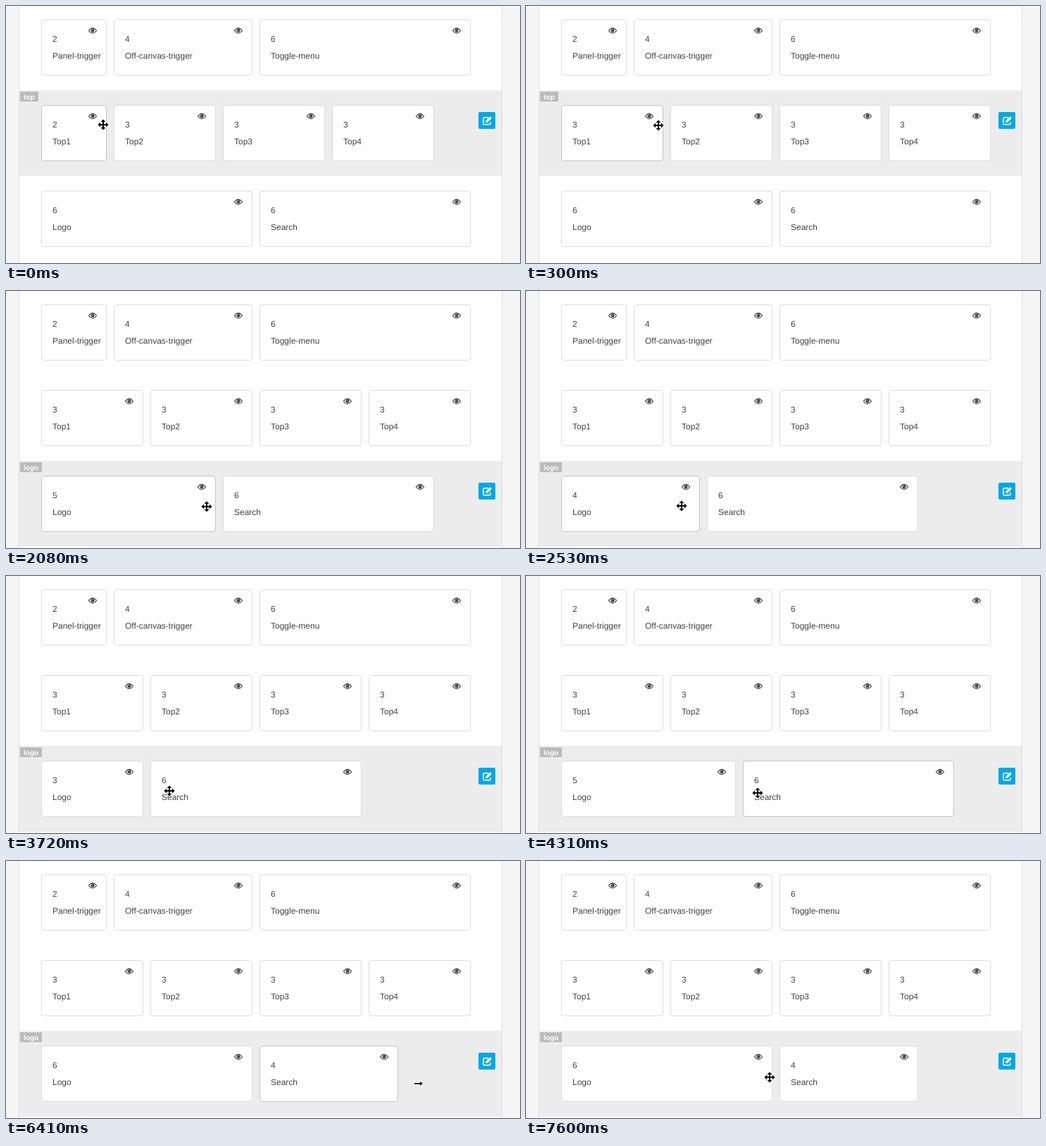
An HTML page with a canvas that plays this animation: 730x366 px, repeating every 8 s.

```html
<!DOCTYPE html>
<html lang="en">
<head>
<meta charset="utf-8">
<title>Layout grid editor</title>
<style>
  html, body { margin: 0; width: 100%; height: 100%; overflow: hidden; background: #f5f5f5; }
  canvas { display: block; }
</style>
</head>
<body>
<canvas id="stage" width="730" height="366"></canvas>
<script>
const ctx = document.getElementById('stage').getContext('2d');
const LOOP = 8000, TICK = 149, COLUMN = 155 / 3, GAP = 10, LEFT = 50;
const ROW_HEIGHT = 122, FADE_TICKS = 1.75;
const FONT = '"Liberation Sans", Arial, sans-serif';

const startSpans = {
  'Panel-trigger': 2, 'Off-canvas-trigger': 4, 'Toggle-menu': 6,
  Top1: 2, Top2: 3, Top3: 3, Top4: 3,
  Logo: 6, Search: 6
};
const rows = [
  { label: 'menu', top: -2, names: ['Panel-trigger', 'Off-canvas-trigger', 'Toggle-menu'] },
  { label: 'top', top: 120, names: ['Top1', 'Top2', 'Top3', 'Top4'] },
  { label: 'logo', top: 242, names: ['Logo', 'Search'] }
];
// Cursor moves in ticks; a move with a card drags that card's edge to a new span
const moves = [
  { start: 0, end: 1, x: 188, y: 170, card: 'Top1', span: 3 },
  { start: 5, end: 8, x: 332, y: 309 },
  { start: 9, end: 11, x: 345, y: 309 },
  { start: 12, end: 20, x: 196, y: 305, card: 'Logo', span: 3 },
  { start: 24, end: 31, x: 345, y: 309, card: 'Logo', span: 6 },
  { start: 34, end: 39, x: 661, y: 317 },
  { start: 41, end: 43, x: 586, y: 317, card: 'Search', span: 4 },
  { start: 43, end: 51, x: 346, y: 308 }
];

const smooth = p => p * p * (3 - 2 * p);
const easeOut = p => 1 - (1 - p) ** 1.8;

function stateAt(tick) {
  const state = { x: 138, y: 169, spans: { ...startSpans } };
  for (const { start, end, x, y, card, span } of moves) {
    if (tick <= start) break;
    const p = Math.min(1, (tick - start) / (end - start));
    const eased = card ? easeOut(p) : smooth(p);
    state.x += (x - state.x) * eased;
    state.y += (y - state.y) * eased;
    if (card) state.spans[card] += Math.trunc((span - state.spans[card]) * eased);
  }
  return state;
}

function layout({ top, names }, spans) {
  let left = LEFT;
  return names.map(name => {
    const span = spans[name], x = Math.round(left);
    const right = Math.round(left + span * COLUMN - GAP);
    left += span * COLUMN;
    return { name, span, x, right, top: top + 21 };
  });
}

function cardUnderCursor({ x, y, spans }) {
  const card = rows.flatMap(row => layout(row, spans))
    .find(c => x >= c.x && x <= c.right && y >= c.top && y <= c.top + 80);
  return card && card.name;
}

// Share of the recent past that the cursor spent in the row
function glowOf({ top }, tick) {
  const samples = 24;
  let inside = 0;
  for (let i = 0; i < samples; i++) {
    const { y } = stateAt(tick - FADE_TICKS * i / samples);
    if (y >= top && y < top + ROW_HEIGHT) inside++;
  }
  return inside / samples;
}

function rect(x, y, w, h, color) {
  ctx.fillStyle = color;
  ctx.fillRect(x, y, w, h);
}

function rounded(x, y, w, h, radius, color) {
  ctx.beginPath();
  ctx.roundRect(x, y, w, h, radius);
  ctx.fillStyle = color;
  ctx.fill();
}

function text(string, x, y, color, font) {
  ctx.fillStyle = color;
  ctx.font = `${font} ${FONT}`;
  ctx.fillText(string, x, y);
}

function shape(path, x, y, { fill, stroke, width }) {
  const outline = new Path2D(path);
  ctx.save();
  ctx.translate(x, y);
  if (stroke) {
    ctx.strokeStyle = stroke;
    ctx.lineWidth = width;
    ctx.stroke(outline);
  }
  if (fill) {
    ctx.fillStyle = fill;
    ctx.fill(outline);
  }
  ctx.restore();
}

function eye(x, y) {
  shape('M-5.6 0Q0-7.2 5.6 0Q0 7.2-5.6 0Z', x, y, { stroke: '#444', width: 1.1 });
  shape('M-2.6-.4a2.6 2.6 0 1 0 5.2 0a2.6 2.6 0 1 0-5.2 0', x, y, { fill: '#444' });
  shape('M-1.4-.6A1.4 1.4 0 0 1 0-2', x, y, { stroke: '#fff', width: .6 });
}

function drawCard({ name, span, x, right, top }, active) {
  rounded(x + .5, top + .5, right - x - 1, 79, 3.5, '#fff');
  ctx.strokeStyle = active ? '#c4c4c4' : '#dcdcdc';
  ctx.lineWidth = 1;
  ctx.stroke();
  text(span, x + 16, top + 32, '#444', '12px');
  text(name, x + 16, top + 56, '#444', '12px');
  eye(right - 20, top + 16);
}

function drawRow(row, tick, spans, hovered) {
  const { label, top } = row, glow = glowOf(row, tick);
  if (glow) {
    ctx.globalAlpha = smooth(glow);
    rect(19, top, 685, ROW_HEIGHT, '#ececec');
    const x = Math.round(20 - (1 - glow) * 2.5);
    ctx.font = `bold 10px ${FONT}`;
    ctx.globalAlpha = glow;
    rect(x, top + 2, Math.round(ctx.measureText(label).width) + 10, 14, '#bbb');
    ctx.globalAlpha = Math.min(1, glow * 1.2);
    rounded(671, top + 31, 24, 24, 2, '#00a8e6');
    ctx.globalAlpha = 1;
    text(label, x + 5, top + 12.5, '#fff', 'bold 10px');
    shape('M14 7.7H8.7Q7 7.7 7 9.4V16Q7 17.7 8.7 17.7H15.3Q17 17.7 17 16V14', 671, top + 31, { stroke: '#fff', width: 1.6 });
    shape('M10.2 12.4L16.4 6.2L18.9 8.7L12.7 14.9H10.2Z', 671, top + 31, { fill: '#fff' });
  }
  for (const card of layout(row, spans)) drawCard(card, card.name === hovered);
}

function drawCursor(x, y, resizing) {
  const move = 'M-1-1V-4H-3.5L0-7.5L3.5-4H1V-1H4V-3.5L7.5 0L4 3.5V1H1V4H3.5L0 7.5L-3.5 4H-1V1H-4V3.5L-7.5 0L-4-3.5V-1Z';
  const resize = 'M-6-1H2V-3L6 0L2 3V1H-6Z';
  shape(resizing ? resize : move, Math.round(x), Math.round(y), { fill: '#000', stroke: '#fff', width: 2 });
}

function draw(now) {
  const tick = Math.floor((now % LOOP + 10) / TICK);
  const state = stateAt(tick);
  const hovered = cardUnderCursor(stateAt(tick - 1)); // hover style lags one tick
  rect(0, 0, 730, 366, '#f5f5f5');
  rect(18, 0, 687, 366, '#dedede');
  rect(19, 0, 685, 366, '#fefefe');
  for (const row of rows) drawRow(row, tick, state.spans, hovered);
  drawCursor(state.x, state.y, !cardUnderCursor(state));
}

ctx.textRendering = 'geometricPrecision';
const start = performance.now();
function loop() {
  draw(performance.now() - start);
  requestAnimationFrame(loop);
}
loop();
</script>
</body>
</html>
```
